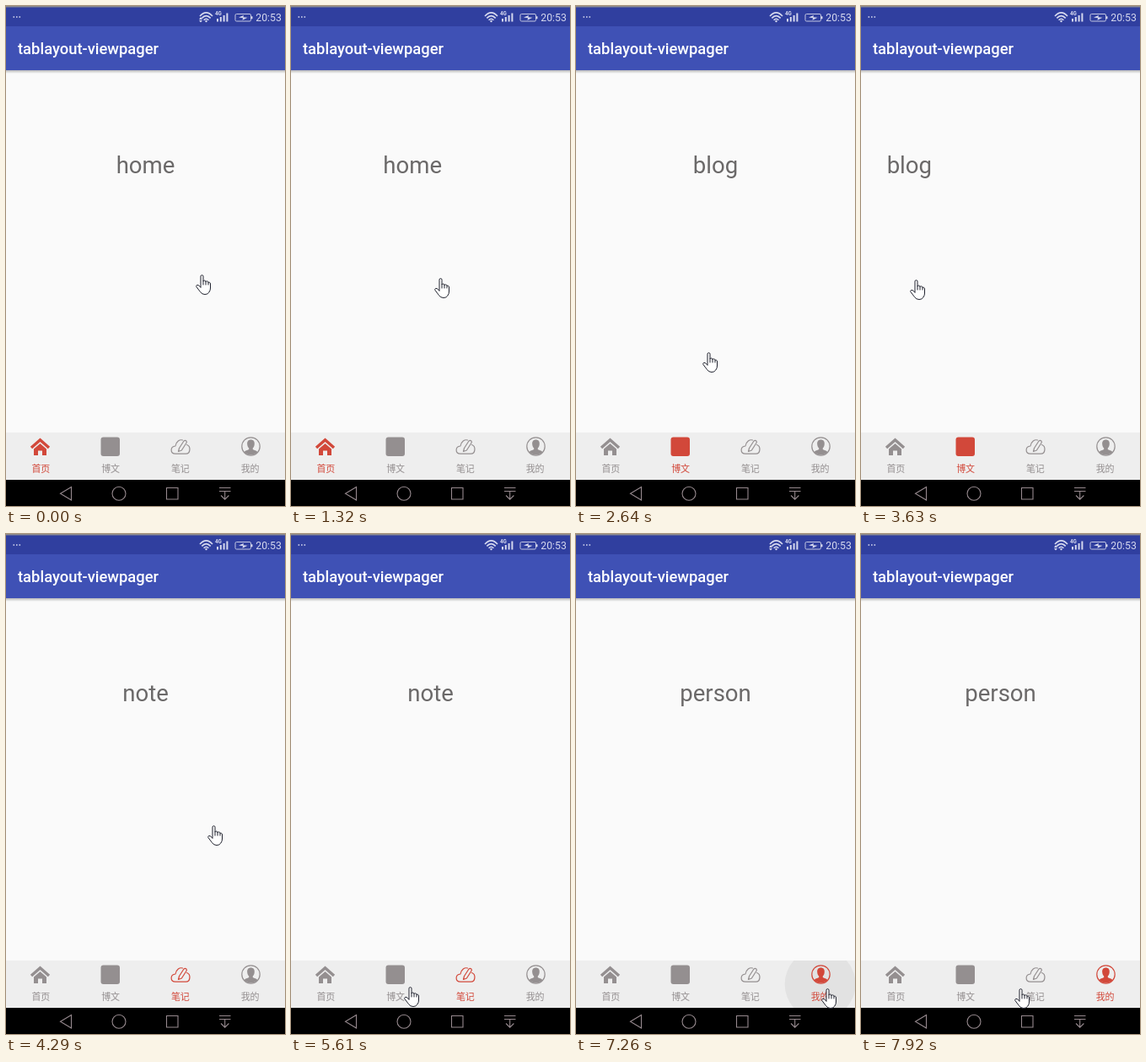
Write an HTML page that moves like this. It is 331x592 px and loops after 8000 ms.

```html
<!DOCTYPE html>
<html lang="zh">
<head>
<meta charset="utf-8">
<title>tablayout-viewpager</title>
<style>
html, body { margin: 0; width: 100%; height: 100%; overflow: hidden; background: #fafafa; }
svg { display: block; width: 100vw; height: 100vh; font-family: Roboto, sans-serif; }
.word { font-size: 27.58px; fill: #6b6969; text-anchor: middle; }
.label { font: 11px "Noto Sans CJK SC", "Noto Sans CJK", sans-serif; text-anchor: middle; fill: currentColor; }
.label, .icon { color: #948f90; }
.on { color: #d2483a; }
.label.on { font-weight: 500; }
.line { fill: none; stroke: currentColor; stroke-width: 1.2; stroke-linejoin: round; stroke-linecap: round; }
.solid { fill: currentColor; }
.nav { fill: none; stroke: #96898e; stroke-width: 1.1; }
.wifi { fill: none; stroke: #d5d8ee; stroke-width: 1.6; }
.battery { fill: none; stroke: #c3c7e2; }
.light { fill: #d5d8ee; }
</style>
</head>
<body>
<svg viewBox="0 0 331 592">
  <defs>
    <linearGradient id="shade" x2="0" y2="1">
      <stop stop-color="#000" stop-opacity=".26"/>
      <stop offset="1" stop-color="#000" stop-opacity="0"/>
    </linearGradient>
    <clipPath id="bar"><rect y="505" width="331" height="56"/></clipPath>
  </defs>

  <rect width="331" height="592" fill="#fafafa"/>
  <g id="pages"></g>

  <rect y="76" width="331" height="4" fill="url(#shade)"/>
  <rect y="23" width="331" height="53" fill="#3f51b5"/>
  <rect width="331" height="24" fill="#303f9f"/>
  <rect width="331" height="1.5" fill="#8b8b90"/>
  <text x="14" y="57" font-size="18.4" font-weight="500" fill="#fff">tablayout-viewpager</text>

  <!-- status bar -->
  <path class="light" d="M8.5 12.2h1.6v1.6h-1.6zM12 12.2h1.6v1.6h-1.6zM15.500 12.2h1.6v1.6h-1.6z"/>
  <path class="wifi" d="M230 12Q237.500 3.800 245 12M232.300 14.400Q237.500 8.800 242.700 14.400M234.600 16.800Q237.500 13.800 240.400 16.800"/>
  <circle class="light" cx="237.500" cy="18" r="1.200"/>
  <path id="arrows" class="light" d="M229 16l2-3 2 3zM229 17l2 2.500 2-2.500z"/>
  <text class="light" x="248" y="11" font-size="6.300" font-weight="700">4G</text>
  <path class="light" d="M250 15h2v3.500h-2zM253.800 13h2v5.500h-2zM257.600 11h2v7.500h-2zM261.400 8.500h2v10h-2z"/>
  <rect class="battery" x="272" y="9.500" width="18.500" height="8.500" rx="1.500"/>
  <path class="light" d="M291 12.200h1.500v3h-1.500zM276 13.500l6-2.500-.5 2.300 5 .4-6 3 .6-2.500z"/>
  <text class="light" x="296.300" y="18" font-size="12.300">20:53</text>

  <!-- tab bar -->
  <rect y="505" width="331" height="56" fill="#eee"/>
  <circle id="ripple" cy="533" r="42" fill="#000" fill-opacity=".05" clip-path="url(#bar)"/>
  <g class="icon">
    <path d="M30 523L40.500 513.800 51 523" fill="none" stroke="currentColor" stroke-width="3.500"/>
    <path class="solid" d="M33 524.500l7.500-6.500 7.500 6.500v7.500h-5v-5.500h-5v5.500h-5z"/>
  </g>
  <g class="icon"><rect class="solid" x="112.500" y="510.500" width="22.500" height="22.500" rx="3"/></g>
  <g class="icon">
    <path class="line" d="M209.500 514C206 513 202 515.500 201 521C194.500 521.500 194.500 530.200 201 530.200H213.500C219 530.200 219.500 521 214.500 519.500"/>
    <path class="line" d="M204.500 527.500l1-4 5.500-8.500q1.600-1.400 3 .1.800 1-.1 2.400l-5.500 8.500z"/>
  </g>
  <g class="icon">
    <circle class="line" cx="290.500" cy="521.500" r="10.700"/>
    <path class="solid" d="M290.500 513.500c3.200 0 4.500 2.200 4.300 5.200-.2 2.500-1 3.800-2 4.800v1.500c1.700 1.200 4.700 1.300 5.700 3.200q-3.500 3.300-8 3.300t-8-3.300c1-1.900 4-2 5.700-3.200v-1.500c-1-1-1.800-2.300-2-4.800-.2-3 1.100-5.200 4.300-5.200z"/>
  </g>
  <g id="labels"></g>

  <!-- navigation bar -->
  <rect y="561" width="331" height="31" fill="#000"/>
  <path class="nav" d="M77.500 569.500v15.500L64.500 577.300zM190.500 570.500h13.500v13.500h-13.500zM253 570.500h13.500M253 574.500h13.500M259.700 574.500v9.500M255 579.500l4.700 4.700 4.700-4.700"/>
  <circle class="nav" cx="134" cy="577.300" r="8"/>

  <g id="hand" fill="#fff" stroke="#20222e" stroke-linejoin="round" stroke-linecap="round">
    <path d="M6 15V2.200Q6 .6 7.500 .6Q9 .6 9 2.200V8Q9.300 7 10.500 7Q12 7 12 8.600Q12.300 7.700 13.500 7.800Q15 8 15 9.600Q15.400 9 16.300 9.200Q17.500 9.500 17.500 11V16Q17.500 19 15.800 21Q14.300 23.500 11 23.500Q7.500 23.500 5.600 20.600L1 14.600Q.3 13 1.500 12.400Q3 12 4.400 13.400Z"/>
    <path d="M9 8v4M12 8.600v3.400M15 9.600v2.400" fill="none"/>
  </g>
</svg>
<script>
const LOOP = 8000, TICK = 330, WIDTH = 331, BAR_TOP = 505;
const $ = id => document.getElementById(id);

const texts = (words, style, step, y) => words.map((word, i) =>
  `<text class="${style}" x="${(i + .5) * step}" y="${y}">${word}</text>`).join('');
$('pages').innerHTML = texts(['home', 'blog', 'note', 'person'], 'word', WIDTH, 198);
$('labels').innerHTML = texts(['首页', '博文', '笔记', '我的'], 'label', WIDTH / 4, 552);
const icons = document.querySelectorAll('.icon');
const labels = document.querySelectorAll('.label');

// key points of the pointer: tick, x, y
const stops = [
  [0, 225, 318], [2, 214, 324], [3, 22, 322], [4, 170, 322], [5, 236, 324],
  [6, 49, 316], [8, 150, 410], [9, 264, 330], [11, 58, 324], [13, 239, 345],
  [14, 55, 338], [16, 134, 536], [19, 134, 536], [20, 291, 537], [23, 291, 538], [24, 182, 538]
];
// page turns: start, duration in ticks, page reached
const turns = [[2, 1, .325], [3, 1.4, 0], [6, 1.7, 1], [10.35, 1.7, 2], [18, 1, 1], [21, 1, 3]];

const mix = (a, b, u) => a + (b - a) * u;
const smooth = u => u * u * (3 - 2 * u);
const progress = (tick, start, span) => Math.min(1, Math.max(0, (tick - start) / span));

const pageAt = tick => turns.reduce((page, [start, span, next]) =>
  mix(page, next, smooth(progress(tick, start, span))), 0);

const tabAt = tick => Math.round(pageAt(tick));

function handAt(tick) {
  const i = Math.max(1, stops.findIndex(stop => stop[0] >= tick));
  const [t0, x0, y0] = stops[i - 1], [t1, x1, y1] = stops[i];
  const u = progress(tick, t0, t1 - t0);
  return [mix(x0, x1, u), mix(y0, y1, u)].map(Math.round);
}

const show = (el, on) => el.setAttribute('visibility', on ? 'visible' : 'hidden');
const move = (el, x, y) => el.setAttribute('transform', `translate(${x} ${y})`);
const select = (items, n) => items.forEach((el, i) => el.classList.toggle('on', i === n));

function draw(tick) {
  const [x, y] = handAt(tick), tab = tabAt(tick);
  move($('pages'), -pageAt(tick) * WIDTH, 0);
  move($('hand'), x, y);
  select(labels, tab);
  select(icons, tab);
  // a tap on the bar leaves a ripple for one tick
  show($('ripple'), y > BAR_TOP && tab !== tabAt(tick - 1));
  $('ripple').setAttribute('cx', (tab + .5) * WIDTH / 4);
  show($('arrows'), tick < 1 || tick >= 22);
}

const start = performance.now();
function frame() {
  draw(Math.floor((performance.now() - start) % LOOP / TICK));
  requestAnimationFrame(frame);
}
frame();
</script>
</body>
</html>
```
